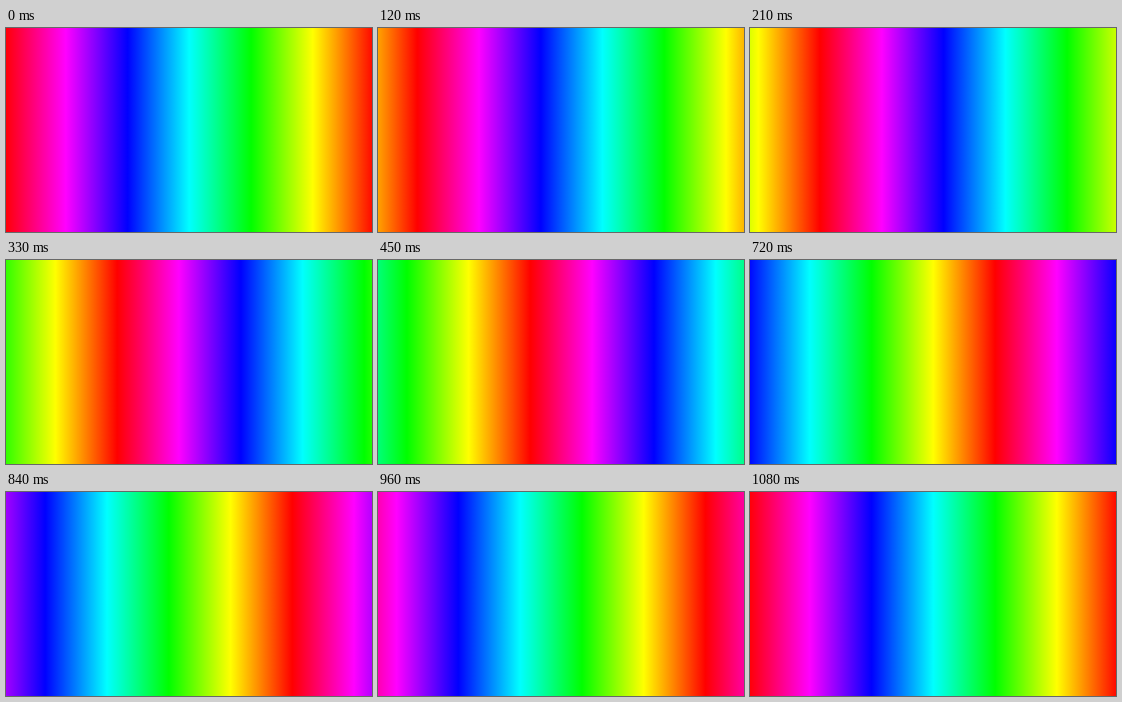
Recreate the animation shown at these times as an HTML page. Size 560x312 px, loop 1.11 s.

```html
<!DOCTYPE html>
<html lang="en">
<head>
<meta charset="utf-8">
<title>Rainbow drift</title>
<style>
  html, body { margin: 0; width: 100%; height: 100%; overflow: hidden; background: #f00; }
  #stage { position: relative; width: 560px; height: 312px; overflow: hidden; }
  #band {
    position: absolute; top: 0; height: 312px;
    background: repeating-linear-gradient(90deg,
      #f00 0, #f0f 94.5px, #00f 189px, #0ff 283.5px, #0f0 378px, #ff0 472.5px, #f00 567px);
  }
</style>
</head>
<body>
<div id="stage"><div id="band"></div></div>
<script>
  const period = 567;   // width of one full rainbow
  const ticks = 37;     // the last tick repeats the first pose
  const step = period / (ticks - 1);
  const band = document.getElementById('band');

  // Centre cyan on the stage, with spare rainbows to slide in from the left.
  band.style.left = 280 - period * 2.5 + 'px';
  band.style.width = period * 4 + 'px';

  band.animate(
    [{ transform: 'translateX(0)' }, { transform: `translateX(${step * ticks}px)` }],
    { duration: ticks * 30, iterations: Infinity, easing: `steps(${ticks}, end)` }
  );
</script>
</body>
</html>
```
